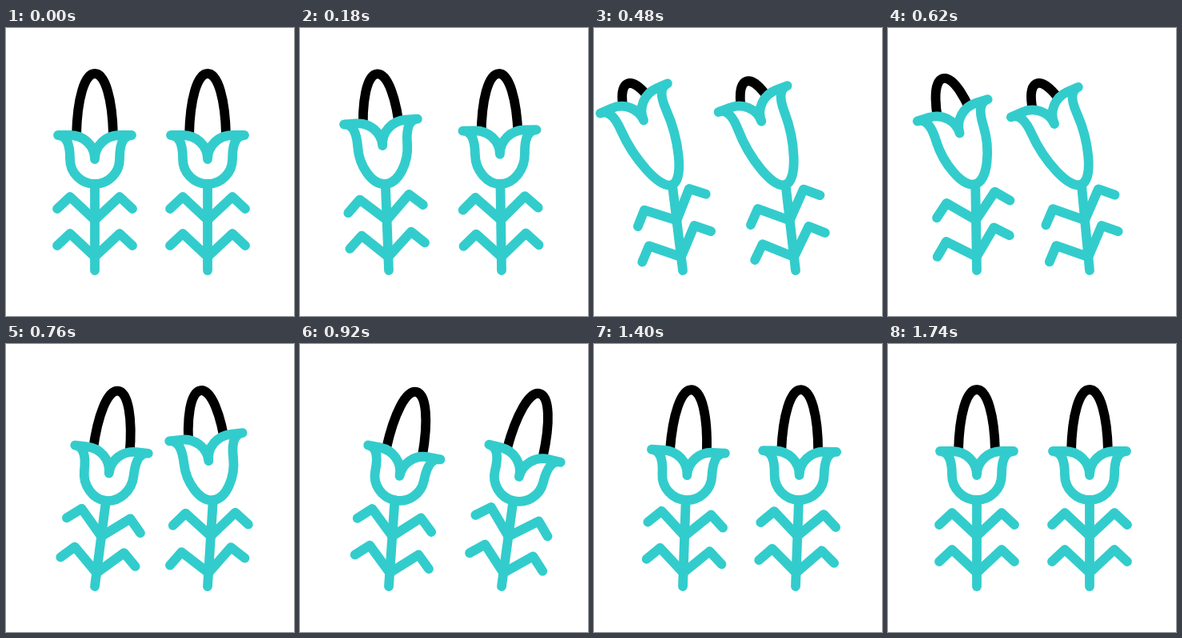
An HTML page that plays this animation: 360x360 px, repeating every 2400 ms.

```html
<!DOCTYPE html>
<html lang="en">
<head>
<meta charset="utf-8">
<title>Tulip earrings</title>
<style>
  html, body { margin: 0; width: 100%; height: 100%; overflow: hidden; background: #fff; }
  svg { display: block; width: 100%; height: 100%; }
  path { fill: none; stroke: #3cc; stroke-width: 11.8; stroke-linecap: round; stroke-linejoin: round; }
  .hook { stroke: #000; stroke-linecap: butt; }
  .cup { fill: #fff; }
</style>
</head>
<body>
<svg id="stage" viewBox="0 0 360 360"></svg>
<script>
const LOOP = 2400;
const RIGHT_DELAY = 75;
const STEM = 108;
const KEY_TIMES = [0, 475, 810, 1080, 1345, 1620];

// Swing extremes at each key time; lag delays the whole swing.
const SWINGS = {
  stem:      { lag: 0,  values: [0, -7, 8.2, -3.5, 2.2, 0] },
  stretch:   { lag: 5,  values: [0, 57, 0, 0, 0, 0] },
  upperLeaf: { lag: 25, values: [0, -25.5, 16.5, -9, 4.5, 0] },
  lowerLeaf: { lag: 45, values: [0, -24.5, 14, -8.5, 4, 0] },
  cup:       { lag: 50, values: [0, -24.5, 14, -9, 3, 0] }
};

const LEAF = 'M-47-14 L-31-29 L0 0 L31-29 L47-14';
const HOOK = 'M-23-61 C-22-106 -13-138 0-138 C13-138 22-106 23-61';

const stage = document.getElementById('stage');

function add(parent, tag, attributes = {}) {
  const node = document.createElementNS('http://www.w3.org/2000/svg', tag);
  for (const name in attributes) node.setAttribute(name, attributes[name]);
  return parent.appendChild(node);
}

function makeEarring(x, delay) {
  const root = add(stage, 'g', { transform: `translate(${x} 303)` });
  const head = add(root, 'g');
  add(head, 'path', { class: 'hook', d: HOOK });
  const cup = add(head, 'path', { class: 'cup' });
  const stem = add(root, 'path');
  const lowerLeaf = add(root, 'path', { d: LEAF });
  const upperLeaf = add(root, 'path', { d: LEAF });
  return { delay, head, cup, stem, lowerLeaf, upperLeaf };
}

function sample({ lag, values }, time) {
  const t = time - lag;
  if (t <= 0) return values[0];
  const next = KEY_TIMES.findIndex(key => key > t);
  if (next < 0) return values[values.length - 1];
  const from = KEY_TIMES[next - 1];
  const u = (t - from) / (KEY_TIMES[next] - from);
  const eased = (1 - Math.cos(Math.PI * u)) / 2;
  return values[next - 1] + (values[next] - values[next - 1]) * eased;
}

function cupPath(k) {
  const rim = -61 - k, side = -31 - k, low = -14 - 0.65 * k;
  return `M-46 ${rim} C-34 ${rim} -31 ${rim + 13} -31 ${side}
    C-31 ${low} -17 0 0 0 C17 0 31 ${low} 31 ${side}
    C31 ${rim + 13} 34 ${rim} 46 ${rim} H31
    C14 ${rim} 0 ${rim + 13} 0 ${side} C0 ${rim + 13} -14 ${rim} -31 ${rim} Z`;
}

function pose(earring, time) {
  const at = name => sample(SWINGS[name], time - earring.delay);
  const lean = at('stem') * Math.PI / 180;
  const point = height => `${height * Math.sin(lean)} ${-height * Math.cos(lean)}`;
  const place = (node, height, angle) =>
    node.setAttribute('transform', `translate(${point(height)}) rotate(${angle})`);

  earring.stem.setAttribute('d', `M0 0 L${point(STEM)}`);
  place(earring.lowerLeaf, 17, at('lowerLeaf'));
  place(earring.upperLeaf, 63, at('upperLeaf'));
  place(earring.head, STEM, at('cup'));
  earring.cup.setAttribute('d', cupPath(at('stretch')));
}

const earrings = [makeEarring(111, 0), makeEarring(252, RIGHT_DELAY)];
const start = performance.now();

function draw(now) {
  const time = Math.max(0, now - start) % LOOP;
  earrings.forEach(earring => pose(earring, time));
  requestAnimationFrame(draw);
}
draw(start);
</script>
</body>
</html>
```
